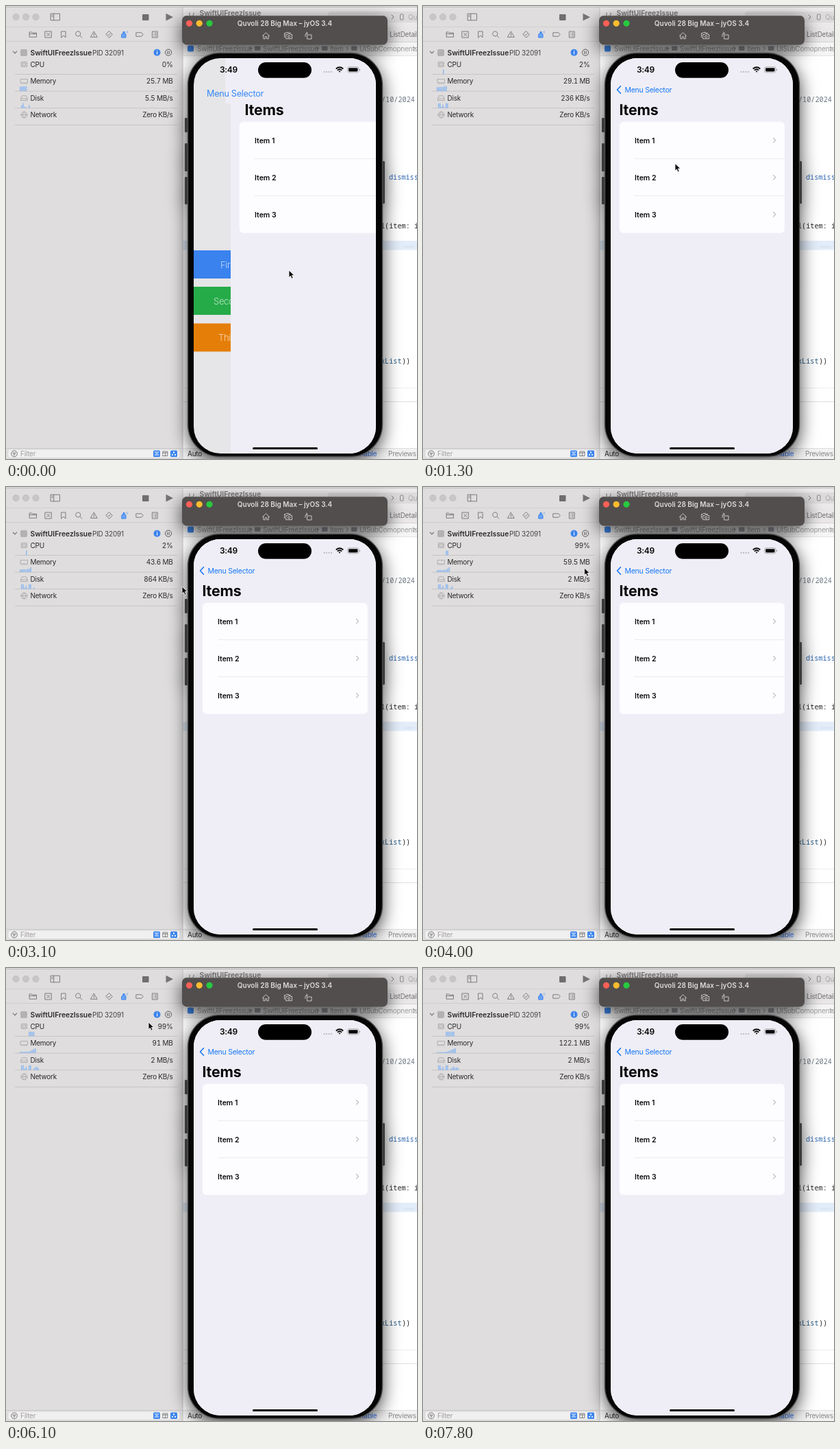
Recreate the animation shown at these times as an HTML page. Size 600 by 660 pixels, loop 7.9 s.

```html
<!DOCTYPE html>
<html lang="en">
<head>
<meta charset="utf-8">
<title>Debug session</title>
<style>
html, body { margin: 0; width: 100%; height: 100%; overflow: hidden; background: #e4e2e2; }
svg { display: block; width: 600px; height: 660px; }
text { font: 10px Inter, "Open Sans", sans-serif; letter-spacing: -.025em; white-space: pre; }
.bold { font-weight: 600; letter-spacing: 0; }
.value { font-variant-numeric: tabular-nums; }
.mono { font: 10.2px "Noto Sans Mono", "DejaVu Sans Mono", monospace; letter-spacing: 0; }
.shadow { filter: drop-shadow(0 7px 13px rgba(0, 0, 0, .72)); }
.icon { fill: none; stroke: #727071; stroke-width: .9; stroke-linecap: round; stroke-linejoin: round; }
</style>
</head>
<body>
<svg id="stage" viewBox="0 0 600 660" xmlns="http://www.w3.org/2000/svg"></svg>
<script>
const LOOP = 7900, STEP = 100;
const INK = '#2b2a2b', BLUE = '#1678f5', PAGE = '#efeef6';

const rect = (x, y, w, h, fill, rx = 0, more = '') =>
  `<rect x="${x}" y="${y}" width="${w}" height="${h}" rx="${rx}" fill="${fill}" ${more}/>`;
const circle = (x, y, r, fill, more = '') => `<circle cx="${x}" cy="${y}" r="${r}" fill="${fill}" ${more}/>`;
const text = (x, y, s, fill = INK, more = '') => `<text x="${x}" y="${y}" fill="${fill}" ${more}>${s}</text>`;
const size = px => `style="font-size:${px}px"`;
const bold = px => `class="bold" ${size(px)}`;
const hline = (x, y, w, fill) => rect(x, y, w, 1, fill);
const icon = (x, y, d, more = '') => `<path class="icon" transform="translate(${x} ${y})" d="${d}" ${more}/>`;
const chevron = (x, y, h, color, width) =>
  `<path d="M${x} ${y - h}l${h} ${h}l${-h} ${h}" fill="none" stroke="${color}" stroke-width="${width}" stroke-linecap="round" stroke-linejoin="round"/>`;

const shape = {
  folder: 'M-5-3.5h3l1 1.2h6v6h-10zM-5-.8h10',
  box: 'M-4.5-4.5h9v9h-9zM-2-2l4 4M2-2l-4 4',
  bookmark: 'M-3-4.5h6v9l-3-3l-3 3z',
  search: 'M2 1a3.6 3.6 0 1 0-1 1M1.6 1.6l3 3',
  warning: 'M0-4.2l4.7 8h-9.4zM0-1.3v2.4M0 2.4v.1',
  diamond: 'M0-4.7l4.7 4.7l-4.7 4.7l-4.7-4.7zM-1.7 0l1.2 1.3l2.2-2.6',
  spray: 'M-4-.5l2-1.5h2l2 1.5v5h-6zM-2-2v-2h2v2M2.5-3.5h.1M4.3-4.5h.1M4.3-2.5h.1',
  tag: 'M-5-2.7h7.5l2.5 2.7l-2.5 2.7h-7.5z',
  report: 'M-3.7-4.5h7.4v9h-7.4zM-2-2.2h.1M0-2.2h2M-2 0h.1M0 0h2M-2 2.2h.1M0 2.2h2',
  chip: 'M-3.5-3.5h7v7h-7zM-1.7-1.7h3.4v3.4h-3.4zM-4.5-1.5h1M-4.5 1.5h1M3.5-1.5h1M3.5 1.5h1',
  memory: 'M-5-2.8h10v5.4h-10zM-3 2.6v1.2M0 2.6v1.2M3 2.6v1.2',
  disk: 'M-4.7 1l1.7-4.2h6l1.7 4.2v2.6h-9.4zM-4.7 1h9.4',
  globe: 'M-4.5 0a4.5 4.5 0 1 0 9 0a4.5 4.5 0 1 0-9 0M-4 0h8M0-4.3c-3 3-3 6 0 8.6c3-2.6 3-5.6 0-8.6',
  home: 'M-5 0l5-4.7l5 4.7M-3.7-.7v5h2.5v-3h2.4v3h2.5v-5',
  camera: 'M-5.5 2v-6h2l.8-1h3.4l.8 1h2M-3-2h2l.8-1.2h2.6l.8 1.2h2.3v6.2h-8.5zM-.5 1a1.7 1.7 0 1 0 3.4 0a1.7 1.7 0 1 0-3.4 0',
  rotate: 'M-1.5-1.5h6v6h-6zM-4.5 1v-2.5q0-2.5 3-2.5M-3-5.5l1.7 1.5l-1.7 1.5',
};

function navigator() {
  const tools = ['folder', 'box', 'bookmark', 'search', 'warning', 'diamond', 'spray', 'tag', 'report'];
  const rows = [['chip', 'CPU'], ['memory', 'Memory'], ['disk', 'Disk'], ['globe', 'Network']];
  return rect(0, 2, 258, 658, '#dfdddd') + hline(0, 1, 600, '#bcbaba') +
    [14.5, 29, 43.5].map(x => circle(x, 16, 4.7, '#c8c6c6', 'stroke="#bbb9b9" stroke-width=".6"')).join('') +
    icon(72, 16, 'M-6.5-4.8h13v9.6h-13zM-2.3-4.8v9.6M-5-2.5h1.2M-5-.5h1.2') +
    rect(199, 12, 9.5, 9, '#706e6f', 1) +
    '<path d="M233.5 10.800l10.500 5.400l-10.500 5.400z" fill="#767475"/>' +
    hline(0, 30, 258, '#d2d0d0') + hline(0, 51, 258, '#cfcdcd') +
    tools.map((n, i) => icon(39.5 + i * 22.25, 41.5, shape[n], n === 'spray' ? 'style="stroke:#2f7df0;fill:#6ba4f3"' : '')).join('') +
    icon(13, 67.5, 'M-2.7-1.4l2.7 2.8l2.7-2.8', 'style="stroke-width:1.2"') +
    rect(21, 63, 10, 10, '#b3b1b2', 2) +
    text(35.5, 71.5, 'SwiftUIFreezIssue', INK, bold(10.3)) + text(126, 71.5, 'PID 32091', '#454445') +
    circle(220.5, 67.7, 5, '#3c83ee') + rect(220, 66.5, 1.1, 4, '#fff') + rect(220, 64.5, 1.1, 1.1, '#fff') +
    circle(237, 67.7, 4.6, 'none', 'stroke="#5b595a"') + rect(235.2, 65.5, 1, 4.5, '#5b595a') + rect(237.6, 65.5, 1, 4.5, '#5b595a') +
    rows.map(([n, label], i) => icon(26.5, 85 + i * 24.5, shape[n], 'style="stroke:#aaa8a9"') +
      text(35.5, 88.6 + i * 24.5, label) + hline(13, 99 + i * 24.6, 237, '#c7c5c6')).join('') +
    hline(0, 644, 258, '#cbc9ca') + rect(3, 646, 251, 12.5, '#f1f0f0', 3, 'stroke="#cfcdce" stroke-width=".6"') +
    circle(12, 652.3, 4.4, 'none', 'stroke="#777"') + icon(12, 652.3, 'M-2.3-1.3h4.6M-1.5.4h3M-.6 2h1.2') +
    text(21, 656, 'Filter', '#a09e9f') +
    rect(215, 647.5, 10, 9.5, '#3d86ee', 1.5) + icon(220, 652, 'M-3-2h6M-1.5 0h3M-3 2h6', 'style="stroke:#fff"') +
    rect(227.5, 647.5, 10, 9.5, '#f1f0f0', 1.5) + icon(232.5, 652, 'M-3.3-3h6.6v6.5h-6.6zM-3.3-1h6.6M0-1v4') +
    rect(240, 647.5, 10, 9.5, '#3d86ee', 1.5) + circle(245, 650.4, 1.1, '#fff') + circle(243, 653.8, 1.1, '#fff') + circle(247, 653.8, 1.1, '#fff');
}

function editor() {
  const crumb = (x, s) => rect(x, 58.5, 8.5, 6.5, '#a3a5aa', 1) + text(x + 12, 65.5, s, '#a09fa0');
  const sep = x => chevron(x, 62, 2.5, '#888', 1);
  const code = (x, y, s, color = INK) => text(x, y, s, color, 'class="mono"');
  return rect(258, 2, 342, 658, '#fff') + rect(258, 2, 342, 29, '#ebe9ea') + rect(258, 31, 342, 21, '#e9e7e8') +
    rect(258, 52, 342, 20, '#f6f5f6') + hline(258, 52, 342, '#d6d4d5') + hline(258, 72, 342, '#e4e3e4') +
    icon(271, 14, 'M-3-4v8M3-4v2q0 2.5-6 3') + text(282.5, 13.8, 'SwiftUIFreezIssue', '#7c7a7b', bold(10.3)) +
    rect(470, 8, 140, 16, '#dddbdc', 4) + chevron(563, 16, 3, '#777', 1) +
    rect(575.5, 12, 4.5, 8, 'none', 1, 'stroke="#888"') + text(587, 20, 'Quv', '#aaa') +
    text(560, 45, 'ListDetail', '#777576') +
    rect(265, 57.5, 9, 9, '#3f86e8', 2) + text(279, 65.5, 'SwiftUIFreezIssue', '#a09fa0') + sep(355) +
    crumb(363, 'SwiftUIFreezIssue') + sep(454) + crumb(461, 'Item') + sep(497) +
    crumb(504, 'UISubComopnents') + sep(595) +
    code(548, 139.5, '/10/2024', '#707b86') + code(559, 252.5, 'dismiss', '#2e67b1') +
    code(547, 323.5, 'l(item: i') + rect(258, 342, 342, 13.5, '#e3edfa') +
    rect(580, 349, 16, 4, '#dce6f4', 1) + code(546, 407.5, ')') +
    code(547, 521, 'kList', '#285b84') + code(578, 521, '))') +
    hline(258, 556, 342, '#ededed') + hline(258, 576, 342, '#dedede') + hline(258, 644, 342, '#dedede') +
    rect(258, 645, 342, 15, '#f3f2f3') + text(265, 656, 'Auto', INK) +
    text(505, 656, 'Variable', '#3478f6') + text(558, 656, 'Previews', '#8a8889') +
    rect(257.5, 2, 1, 658, '#c5c3c4');
}

function device() {
  const key = (x, y, h) => rect(x, y, 4, h, '#3a393a', 1.2);
  const light = (x, c) => circle(x, 25.3, 4.6, c);
  const pale = 'style="stroke:#d5d3d3"';
  return `<g class="shadow">${key(261, 163, 21)}${key(261, 200, 41)}${key(261, 249, 40)}${key(549, 226, 62)}` +
    rect(265.5, 68.5, 284, 588, '#050505', 47, 'stroke="#504f50" stroke-width="1.4"') +
    rect(257, 14, 300, 42.5, '#514e4d', 7) + '</g>' +
    hline(264, 14, 286, '#6b6867') +
    light(267.5, '#fe5f57') + light(282.2, '#febc2e') + light(297, '#28c840') +
    text(407, 28.5, 'Quvoli 28 Big Max – jyOS 3.4', '#dddbdb', 'text-anchor="middle" ' + bold(10)) +
    icon(379.5, 43.5, shape.home, pale) + icon(412, 43.5, shape.camera, pale) + icon(441.5, 43.5, shape.rotate, pale);
}

function menu() {
  const button = (y, color, x, label) => rect(274, y, 160, 41, color) +
    text(x, y + 25.5, label, '#fff', 'style="font-size:13px;font-weight:300" opacity=".7"');
  return rect(274, 76, 266, 576, '#e6e5e7') +
    button(356, '#3a82ee', 313, 'First Item') + button(409, '#26ab49', 303, 'Second Item') +
    button(462.5, '#e57e08', 310, 'Third Item');
}

function page() {
  const row = i => text(309, 200 + i * 54, `Item ${i + 1}`, '#0b0b0c', bold(10.5)) +
    chevron(511.5, 195.7 + i * 54, 3.2, '#bdbcc1', 1.2) + (i ? hline(309, 168 + i * 54, 219, '#ebeaef') : '');
  return rect(274, 76, 266, 576, PAGE) + rect(286.8, 168.7, 241, 162, '#fdfcff', 6) + [0, 1, 2].map(row).join('');
}

function statusBar() {
  return text(312, 97.2, '3:49', '#050505', 'style="font-size:12px;font-weight:600"') + rect(368, 82, 78, 22.7, '#000', 11.35) +
    [464.5, 468, 471.5, 475].map(x => circle(x, 96, 1, '#adacb2')).join('') +
    '<g fill="none" stroke="#080808" stroke-width="1.7"><path d="M481.7 91.5q5.3-4.5 10.6 0M483.7 93.6q3.3-2.7 6.6 0"/></g>' +
    '<path d="M485.5 95q1.5-1.2 3 0l-1.5 1.8z"/>' +
    rect(498.5, 88.7, 16.5, 8.2, 'none', 2.5, 'stroke="#9d9ca1" stroke-width=".8"') + rect(500, 90.2, 13.5, 5.2, '#080808', 1.3) +
    rect(516, 91.5, 1, 2.7, '#9d9ca1', .5) + rect(360, 643, 95, 3, '#050505', 1.5);
}

const stage = document.getElementById('stage');
stage.innerHTML =
  `<defs><clipPath id="screen">${rect(274, 76, 266, 576, '#000', 39)}</clipPath></defs>` +
  navigator() + editor() + device() + '<g id="stats"></g>' +
  `<g clip-path="url(#screen)">${menu()}<g id="page">${page()}</g>` +
  `<g id="bar">${rect(274, 76, 266, 66, PAGE)}</g>` +
  `<g id="heading">${text(286.5, 159, 'Items', '#050505', 'style="font-size:21.3px;font-weight:700;letter-spacing:-.01em"')}</g>` +
  `<g id="back">${text(0, 0, 'Menu Selector', BLUE, size(10.5))}</g>` +
  `<path id="arrow" d="M288.5 116.800l-5 5.200l5 5.200" fill="none" stroke="${BLUE}" stroke-width="1.6" stroke-linecap="round" stroke-linejoin="round"/>` +
  statusBar() + '</g>' +
  '<path id="cursor" d="M0 0v10.5l2.4-2.2l1.7 3.9l2-.9l-1.7-3.8h3.4z" fill="#080808" stroke="#fff" stroke-width=".8"/>';

const part = id => document.getElementById(id);
const move = (id, x, y = 0, scale = 1) => part(id).setAttribute('transform', `translate(${x} ${y}) scale(${scale})`);
const mix = (a, b, k) => a + (b - a) * k;

// Gauges refresh once a second; each list is indexed by refresh count.
const cpu = [0, 0, 2, 2, 99, 100, 99, 99, 99];
const disk = ['5.5 MB/s', '5.5 MB/s', '236 KB/s', '864 KB/s', '2 MB/s', '3 MB/s', '2 MB/s', '2 MB/s', '2 MB/s'];
const memory = [23.8, 24.6, 25.2, 25.5, 25.7, 29.2, 29.1, 43.6, 59.5, 75.4, 91, 106.5, 122.1];
const diskEarly = [4, 7, 2, 1, 0, 4];
const diskLate = [7, 7, 2, 5, 1, 7, 7, 0, 2, 4, 5, 3, 4, 3, 3];

const bars = (x, base, heights) => heights.map((h, i) =>
  h ? rect((x + i * 2.2).toFixed(1), (base - h).toFixed(1), 1.5, h.toFixed(1), '#8db8f0') : '').join('');

function stats(n) {
  const used = memory.slice(0, n + 5), peak = Math.max(...used);
  const load = n < 2 ? [] : n < 4 ? [7] : Array(n - 2).fill(6.7);
  const io = n === 0 ? diskEarly : n === 1 ? [] : diskLate.slice(0, n + 6);
  const values = [`${cpu[n]}%`, `${used[n + 4]} MB`, disk[n], 'Zero KB/s'];
  return bars(n < 4 ? 29 : 33.2, 99.5, load) + bars(20, 124, used.map(v => v / peak * 7)) + bars(22, 148.7, io) +
    values.map((v, i) => text(243.5, 88.6 + i * 24.5, v, INK, 'class="value" text-anchor="end"')).join('');
}

const path = [[0, 413, 385], [500, 355, 246], [2100, 381, 213], [3100, 257, 145], [4900, 214, 91], [6100, 208, 79], [7000, 206, 76]];

function pointer(t) {
  const i = path.findIndex(p => p[0] > t);
  const [t0, x0, y0] = path[i - 1], [t1, x1, y1] = path[i];
  const u = (t - t0) / (t1 - t0), k = u * u * (3 - 2 * u);
  return [mix(x0, x1, k), mix(y0, y1, k)];
}

let shown = -1;
function draw(t) {
  const push = t < 500 ? Math.exp(-t / 110) : 0;
  move('page', 54 * push);
  move('bar', 46 * push);
  move('heading', 62 * push);
  move('back', mix(294.5, 293, push), mix(125.8, 132, push), mix(1, 1.21, push));
  part('back').setAttribute('opacity', mix(1, .85, push));
  part('arrow').setAttribute('opacity', 1 - push);

  const n = Math.floor((t + 700) / 1000);
  if (n !== shown) part('stats').innerHTML = stats(shown = n);

  const visible = t < 7000;
  part('cursor').setAttribute('visibility', visible ? 'visible' : 'hidden');
  if (visible) move('cursor', ...pointer(t));
}

const start = performance.now();
function tick() {
  const t = (performance.now() - start) % LOOP;
  draw(Math.floor(t / STEP) * STEP);
  requestAnimationFrame(tick);
}
tick();
</script>
</body>
</html>
```
